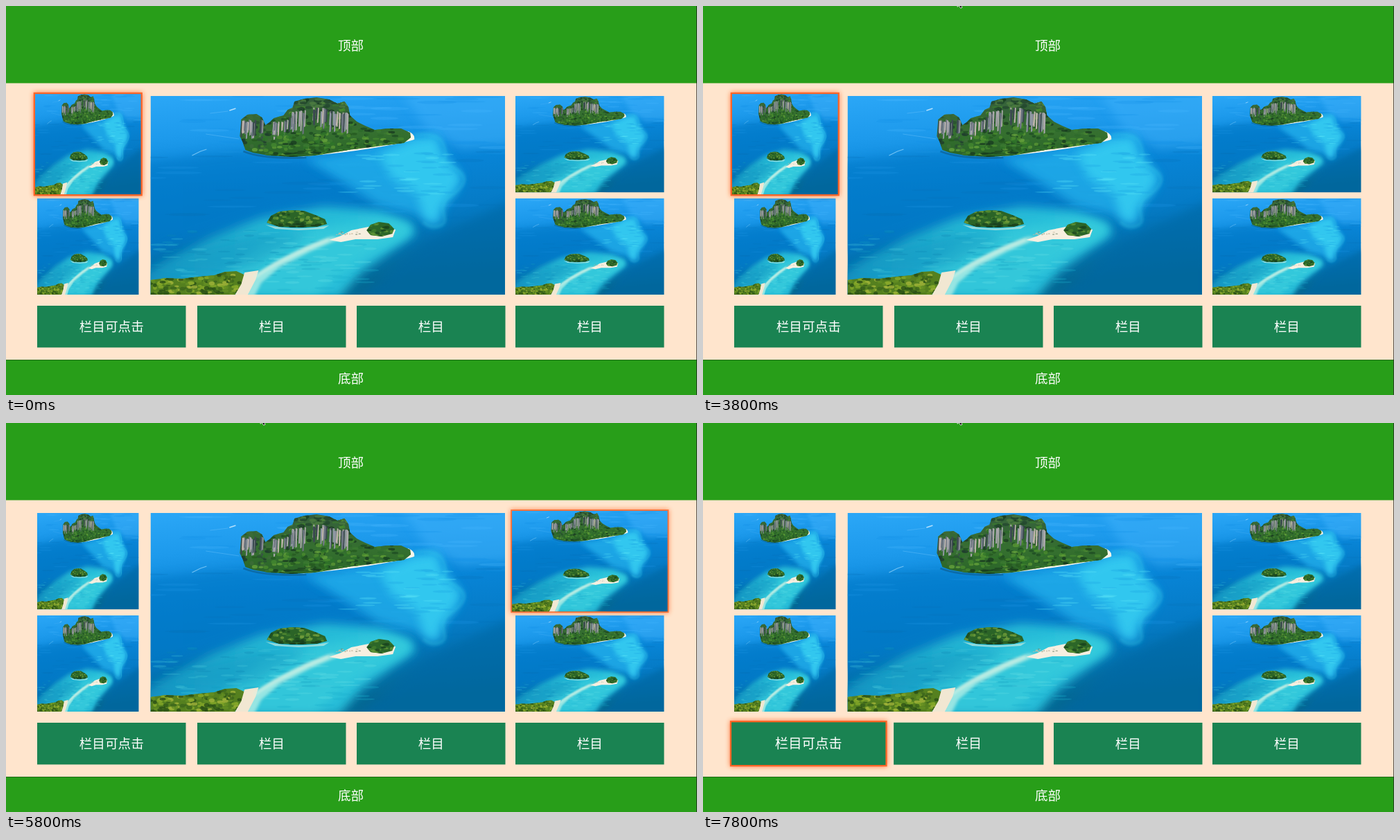
An HTML page for the animation above (8000 ms loop, 997x562 px).

```html
<!DOCTYPE html>
<html lang="zh">
<head>
<meta charset="utf-8">
<title>栏目</title>
<style>
html, body { margin: 0; width: 100%; height: 100%; overflow: hidden; background: #ffe5cd; }
svg { display: block; width: 997px; height: 562px; }
text { font: 18.6px "Noto Sans CJK SC", "Noto Sans CJK", sans-serif; fill: #fff; text-anchor: middle; }
</style>
</head>
<body>
<svg viewBox="0 0 997 562" xmlns="http://www.w3.org/2000/svg">
  <defs>
    <linearGradient id="sea" x1="0.1" y1="0" x2="0.25" y2="1">
      <stop offset="0" stop-color="#2aa6f6"/>
      <stop offset=".2" stop-color="#1d9aec"/>
      <stop offset=".42" stop-color="#0884d6"/>
      <stop offset=".65" stop-color="#057bc6"/>
      <stop offset=".82" stop-color="#0370ae"/>
      <stop offset="1" stop-color="#046894"/>
    </linearGradient>
    <linearGradient id="shoal" x1="0" y1="0" x2="1" y2="0">
      <stop offset="0" stop-color="#128fc0"/>
      <stop offset=".4" stop-color="#22b2d2"/>
      <stop offset="1" stop-color="#2cc6de"/>
    </linearGradient>
    <linearGradient id="hill" x1="0" y1="0" x2="0" y2="1">
      <stop offset="0" stop-color="#355d3c"/>
      <stop offset=".6" stop-color="#35702f"/>
      <stop offset="1" stop-color="#2a6428"/>
    </linearGradient>
    <filter id="soft" x="-30%" y="-30%" width="160%" height="160%"><feGaussianBlur stdDeviation="7"/></filter>
    <filter id="mild" x="-30%" y="-30%" width="160%" height="160%"><feGaussianBlur stdDeviation="2.2"/></filter>
    <filter id="halo" x="-20%" y="-30%" width="140%" height="160%"><feGaussianBlur stdDeviation="3.4"/></filter>
    <clipPath id="frame"><path d="M0 0H512V287H0Z"/></clipPath>
    <clipPath id="isle"><path id="isleShape" d="M129 58L131 34L140 27L153 26L161 31L166 42L172 38L178 32L192 28L198 20L205 17L208 8L222 4L240 2L258 5L270 11L280 8L286 16L288 28L298 37L310 43L324 49L342 47L362 47L375 53L376 60L366 68L340 71L310 75L285 78L262 82L238 86L205 88L170 86L148 82L137 78L133 66Z"/></clipPath>
    <clipPath id="islet1"><path id="islet1Shape" d="M168 183L174 173L186 167L205 165L222 166L238 172L252 178L255 185L240 189L214 190L186 189Z"/></clipPath>
    <clipPath id="islet2"><path id="islet2Shape" d="M312 194L318 186L330 182L344 184L352 192L349 199L334 203L318 201Z"/></clipPath>
    <clipPath id="grove"><path id="groveShape" d="M0 266L22 263L45 264L70 261L92 259L108 254L124 253L135 258L131 272L122 287H0Z"/></clipPath>
    <g id="pic" clip-path="url(#frame)"></g>
  </defs>
  <rect width="997" height="562" fill="#ffe5cd"/>
  <rect width="997" height="111.5" fill="#289e19"/>
  <rect y="511" width="997" height="51" fill="#289e19"/>
  <rect y="511" width="997" height="1" fill="#1d6b17"/>
  <rect x="996" width="1" height="562" fill="#222" opacity=".75"/>
  <text x="497.5" y="63.6">顶部</text>
  <text x="497.5" y="544.6">底部</text>
  <g id="items"></g>
  <path id="cursor" fill="#111" stroke="#fff" stroke-width=".8"/>
</svg>
<script>
const LOOP = 8000, TICK = 200, GROW = 300, ZOOM = 0.05;
const NS = "http://www.w3.org/2000/svg";
const $ = id => document.getElementById(id);

let seed = 7;
const rnd = () => (seed = (seed * 16807) % 2147483647) / 2147483647;
const span = (a, b) => a + (b - a) * rnd();

// Random ellipses inside a box, coloured from a list
function specks(n, [x0, y0, x1, y1], colors, rx, ry, alpha) {
  let out = "";
  for (let i = 0; i < n; i++) {
    const fill = colors[Math.floor(rnd() * colors.length)];
    out += `<ellipse cx="${span(x0, x1).toFixed(1)}" cy="${span(y0, y1).toFixed(1)}" rx="${span(rx * .5, rx).toFixed(1)}" ry="${span(ry * .5, ry).toFixed(1)}" fill="${fill}" opacity="${alpha}"/>`;
  }
  return out;
}

// Vertical streaks of bare rock
function cliff(n, x0, x1, top, height) {
  let out = "";
  for (let i = 0; i < n; i++) {
    const x = span(x0, x1), y = top(x) + span(-3, 3), h = span(height * .5, height);
    const fill = ["#8f97a3", "#a9a8ab", "#6b7480", "#3b4a50", "#c0b6ae"][i % 5];
    out += `<path d="M${x.toFixed(1)} ${y.toFixed(1)}l${span(1.5, 3).toFixed(1)} 1l-1 ${h.toFixed(1)}l-2 1z" fill="${fill}"/>`;
  }
  return out;
}

const leaves = ["#1d4a22", "#2c6a2a", "#45882f", "#5c9a35", "#17391f", "#3b7a30"];
const shape = (d, fill, more = "") => `<path d="${d}" fill="${fill}" ${more}/>`;
const blur = 'filter="url(#soft)"', mild = 'filter="url(#mild)"';
const clipped = (id, inner) => `<g clip-path="url(#${id})">${inner}</g>`;

$("pic").innerHTML = [
  `<rect width="512" height="287" fill="url(#sea)"/>`,
  shape("M360 -10H522V70L450 75L400 50Z", "#3cb0fa", `opacity=".55" ${blur}`),
  shape("M-10 95L130 80L250 100L300 150L180 165L60 205L-10 230Z", "#0478c6", `opacity=".6" ${blur}`),
  shape("M400 210L522 150V300H290Z", "#0368a4", `opacity=".6" ${blur}`),
  specks(45, [0, 0, 512, 75], ["#46b4fa", "#128fe4"], 38, 2.5, .28),
  specks(40, [0, 75, 512, 180], ["#1c94e2", "#0670b8"], 36, 2.5, .25),
  // lagoon east of the island
  shape("M225 92L300 80L375 60L415 55L428 85L452 116L442 140L424 160L420 184L404 188L385 172L330 158L285 128Z", "#23aeea", `opacity=".8" ${blur}`),
  shape("M330 85L380 64L412 60L420 88L448 118L436 138L418 162L414 182L396 178L384 140L350 120Z", "#38d0f2", `opacity=".8" ${blur}`),
  shape("M382 56Q418 52 424 72T420 94Q452 108 453 120T428 148Q420 158 424 172T416 188Q404 192 394 182", "none", `stroke="#3ad6ee" stroke-width="2" opacity=".55" ${mild}`),
  specks(45, [285, 82, 430, 150], ["#5ae2f6", "#1ca4e4"], 16, 1.8, .32),
  // shallows around the sand bar
  shape("M-10 258L40 230L90 203L160 176L250 160L330 166L378 184L382 200L350 222L305 254L272 292H-10Z", "url(#shoal)", blur),
  shape("M100 262L160 215L240 190L350 178L374 188L366 204L318 226L262 268L238 290H130Z", "#38ccdc", `opacity=".75" ${blur}`),
  shape("M0 250L70 222L150 202L230 200L150 245L110 255Z", "#149cc4", `opacity=".55" ${blur}`),
  specks(75, [10, 195, 260, 262], ["#0c86b4", "#48cadc", "#139cc0"], 14, 2, .28),
  specks(40, [170, 205, 320, 282], ["#62dfe4", "#1cb0cc"], 15, 2, .3),
  shape("M126 290L146 262L180 240L225 217L262 203L274 206L230 225L186 248L160 270L150 290Z", "#a9ebe4", `opacity=".85" ${mild}`),
  shape("M122 288L136 255L156 252L152 265L140 288Z", "#f1e7d2"),
  shape("M150 262Q190 234 258 207", "none", `stroke="#d8f2e4" stroke-width="3" ${mild}`),
  shape("M258 208L275 202L290 194L315 189L354 193L350 204L328 207L296 207L275 211Z", "#f7efe0"),
  specks(14, [268, 196, 305, 201], ["#7a8a70", "#c9bda4"], 2, 1, .8),
  // main island
  shape("M215 88Q285 82 335 73T381 62Q382 55 372 51L362 64L300 75Z", "#fbf6ea"),
  shape("M134 80Q165 92 225 89", "none", `stroke="#0d5a8c" stroke-width="2.5" opacity=".6"`),
  `<use href="#isleShape" fill="url(#hill)"/>`,
  clipped("isle",
    specks(170, [168, 2, 300, 88], leaves, 5, 3, .75) +
    specks(110, [225, 38, 378, 84], leaves, 5, 2.6, .75) +
    specks(50, [128, 25, 172, 86], ["#1d3a2c", "#2a5032", "#3c6c38"], 5, 3, .8) +
    cliff(24, 130, 164, () => 36, 24) +
    cliff(18, 176, 204, x => 40 - (x - 176) * .35, 22) +
    cliff(44, 204, 286, x => 18 + Math.abs(x - 240) * .2, 30) +
    specks(45, [178, 2, 288, 19], ["#24482f", "#35643a", "#4a7a40"], 6, 3, .85) +
    specks(80, [150, 54, 300, 86], ["#2f7428", "#4c8e2e", "#24591f", "#6aa63c"], 5, 2.6, .75) +
    specks(18, [140, 80, 250, 90], ["#173c20"], 8, 2, .7)),
  // islets
  shape("M166 186Q212 196 258 187L250 192L214 194L180 192Z", "#bfeadf", `opacity=".7"`),
  `<use href="#islet1Shape" fill="#2b6427"/>`,
  clipped("islet1", specks(65, [168, 165, 255, 186], ["#3d7a2c", "#588f33", "#1c4a20", "#759f3c"], 4, 2.4, .8) +
    specks(16, [168, 185, 255, 191], ["#173c1c"], 6, 2, .8)),
  `<use href="#islet2Shape" fill="#2c6628"/>`,
  clipped("islet2", specks(32, [312, 182, 352, 203], ["#417c2c", "#1a451e", "#5f9436"], 4, 2.4, .8)),
  // near grove
  `<use href="#groveShape" fill="#55801f"/>`,
  clipped("grove", specks(150, [0, 252, 135, 287], ["#85a828", "#3c661c", "#2a4f16", "#a3b53a", "#648f24"], 5, 3, .8)),
  // boats and wakes
  shape("M114 21L123 18", "none", `stroke="#d8f0ff" stroke-width="1.6" opacity=".8"`),
  shape("M60 86L72 80L81 77", "none", `stroke="#8fd2fa" stroke-width="1.3" opacity=".75"`),
  shape("M80 55L128 62M86 25L112 22", "none", `stroke="#62bdf8" stroke-width="1" opacity=".5"`)
].join("");

// x, y, width, height, label (pictures have none)
const layout = {
  mid: [208.5, 130, 511.5, 287],
  leftTop: [45, 130, 146.5, 139.2],
  leftLow: [45, 278, 146.5, 139],
  rightTop: [735, 130, 214.5, 139.2],
  rightLow: [735, 278, 214.5, 139],
  b1: [45, 433, 214.5, 60.4, "栏目可点击"],
  b2: [276, 433, 214.5, 60.4, "栏目"],
  b3: [506, 433, 214.5, 60.4, "栏目"],
  b4: [735, 433, 214.5, 60.4, "栏目"]
};

// Order and start time of each focus
const route = [["leftTop", -3800], ["mid", 4450], ["rightTop", 4720], ["rightLow", 6300],
  ["b4", 6600], ["b3", 7050], ["b2", 7350], ["b1", 7640]];

const box = (w, h, pad, more) =>
  `<rect x="${-w / 2 - pad}" y="${-h / 2 - pad}" width="${w + 2 * pad}" height="${h + 2 * pad}" ${more}/>`;

const items = {};
for (const [name, [x, y, w, h, label]] of Object.entries(layout)) {
  const g = document.createElementNS(NS, "g");
  const face = label
    ? box(w, h, 0, 'fill="#1a8352"') + `<text y="7">${label}</text>`
    : `<use href="#pic" transform="translate(${-w / 2} ${-h / 2}) scale(${w / 512} ${h / 287})"/>`;
  g.innerHTML = box(w, h, 1.5, 'fill="#ff5216" filter="url(#halo)"') + face +
    box(w, h, .5, 'fill="none" stroke="#ff6222"');
  $("items").append(g);
  items[name] = { g, halo: g.firstChild, ring: g.lastChild, cx: x + w / 2, cy: y + h / 2 };
}

// cubic-bezier(.25, .1, .25, 1)
function ease(p) {
  if (p <= 0) return 0;
  if (p >= 1) return 1;
  let lo = 0, hi = 1, u;
  for (let i = 0; i < 20; i++) {
    u = (lo + hi) / 2;
    const x = .75 * u * (1 - u) + u ** 3;
    if (x < p) lo = u; else hi = u;
  }
  return .3 * u * (1 - u) ** 2 + 3 * u * u * (1 - u) + u ** 3;
}

const breathe = age => 1 - Math.sin(Math.PI * age / 4000) ** 4;

function render(t) {
  const grown = {};
  let active, since;
  route.forEach(([name, start], i) => {
    if (t < start) return;
    const end = i + 1 < route.length ? route[i + 1][1] : LOOP;
    const size = ease((Math.min(t, end) - start) / GROW);
    grown[name] = size * (1 - ease((t - end) / GROW));
    active = name;
    since = start;
  });
  const glow = breathe(t - (active === "leftTop" ? 200 : since));
  for (const [name, it] of Object.entries(items)) {
    const s = 1 + (name === "mid" ? 0 : ZOOM * (grown[name] || 0));
    it.g.setAttribute("transform", `translate(${it.cx} ${it.cy}) scale(${s})`);
    const on = name === active;
    it.halo.setAttribute("opacity", on ? .4 + .35 * glow : 0);
    it.ring.setAttribute("opacity", on ? .4 + .55 * glow : 0);
    it.ring.setAttribute("stroke-width", 1 + 1.2 * glow);
  }
  if ($("items").lastChild !== items[active].g) $("items").append(items[active].g);
  $("cursor").setAttribute("d", t < 2200 ? "" : t < 2400
    ? "M373.6 -2H376.4L376 1H374.4Z"
    : "M367 -2V1.2L369.4 -.4L371.6 3.2L374 2.2L372 -2Z");
}

let last = -1;
function loop() {
  const t = Math.floor(performance.now() % LOOP / TICK) * TICK;
  if (t !== last) render(last = t);
  requestAnimationFrame(loop);
}
loop();
</script>
</body>
</html>
```
